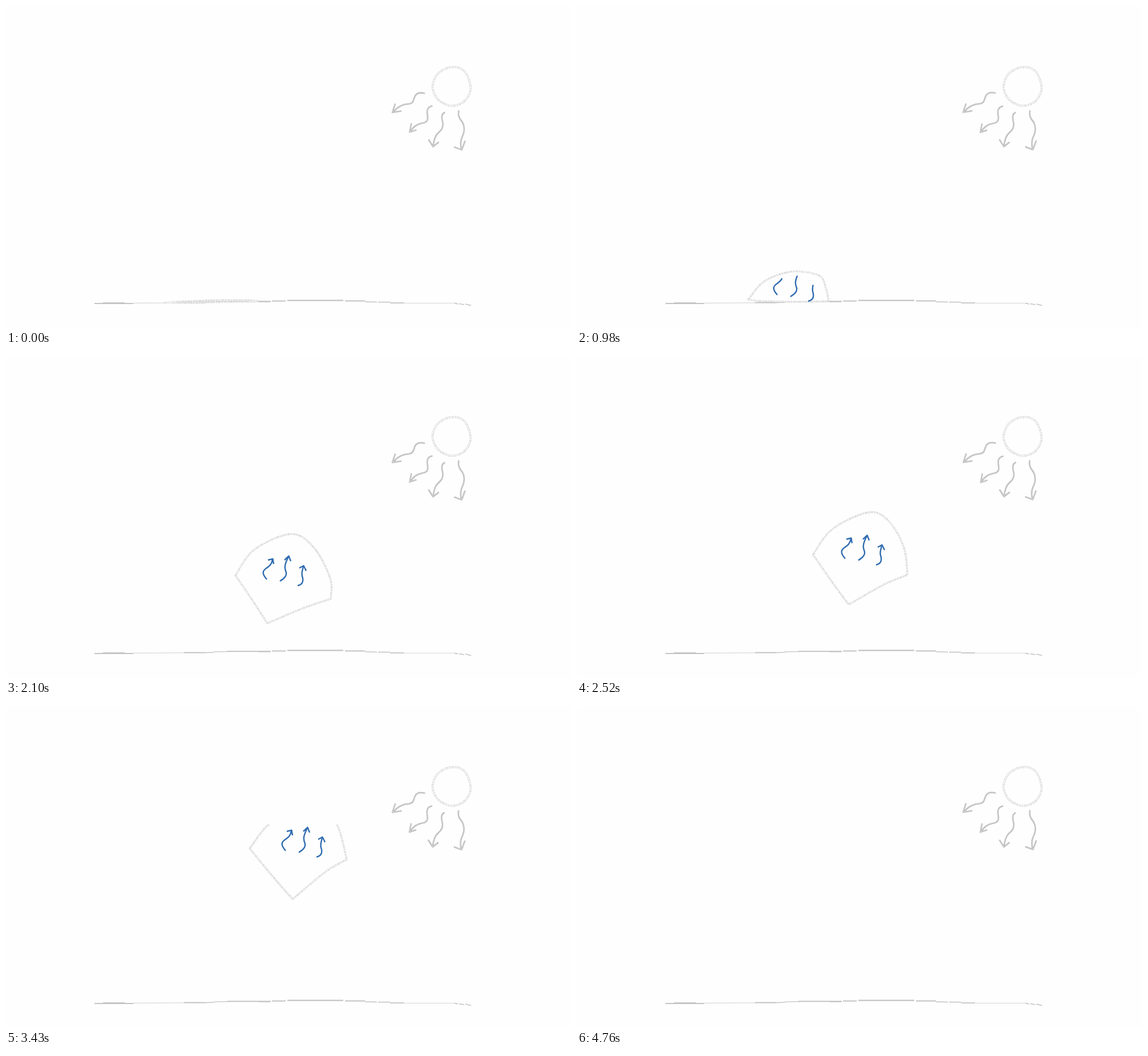
These frames come from a looping animation (990x565 px, 4830 ms). An HTML page:

```html
<!DOCTYPE html>
<html lang="en">
<head>
<meta charset="utf-8">
<title>Rising air</title>
<style>
html, body { margin: 0; width: 100%; height: 100%; overflow: hidden; background: #fefefe; }
svg { display: block; width: 990px; height: 565px; }
path { fill: none; stroke-linejoin: round; }
.edge { stroke: #bdbdbd; stroke-width: 3; stroke-dasharray: 5 1 3 1; }
.core { stroke: #fefefe; stroke-width: 1.5; }
.ray .edge { stroke: #b2b2b2; stroke-width: 2.5; stroke-dasharray: none; }
.ray .core { stroke: #e2e2e2; stroke-width: .8; }
.ground { stroke: #c4c4c4; }
.blue { stroke: #2f6cb0; stroke-width: 2.4; }
#blob .edge { fill: #fefefe; stroke-width: 2.6; }
#blob .core { stroke-width: 1.1; }
</style>
</head>
<body>
<svg viewBox="0 0 990 565">
  <clipPath id="sky"><rect x="0" y="208" width="990" height="314"/></clipPath>
  <g id="ground"></g>
  <g clip-path="url(#sky)"><g id="blob"></g><g id="air"></g></g>
  <g id="sun"></g>
  <g id="rays"></g>
</svg>
<script>
const LOOP = 4830, STEP = 70, PULSE = 700;
const $ = id => document.getElementById(id);

function add(parent, tag, attrs = {}) {
  const el = document.createElementNS('http://www.w3.org/2000/svg', tag);
  for (const k in attrs) el.setAttribute(k, attrs[k]);
  return parent.appendChild(el);
}

// A sketched line: grey edges around a light core.
const sketch = (parent, d = '') => ['edge', 'core'].map(c => add(parent, 'path', { class: c, d }));

// Smooth curve through points, continuing from the first one.
function curve(pts, closed) {
  const n = pts.length;
  const at = i => closed ? pts[(i + n) % n] : pts[Math.max(0, Math.min(n - 1, i))];
  let d = '';
  for (let i = 0; i < (closed ? n : n - 1); i++) {
    const [a, b, c, e] = [at(i - 1), at(i), at(i + 1), at(i + 2)];
    const xy = [0, 1].map(k => [b[k] + (c[k] - a[k]) / 6, c[k] - (e[k] - b[k]) / 6, c[k]]);
    d += 'C' + [0, 1, 2].map(j => xy[0][j].toFixed(2) + ',' + xy[1][j].toFixed(2)).join(' ');
  }
  return d;
}

// Ground pieces: path and line width.
[
  ['M155,522H223', 2.2], ['M170,520.5H208', 1], ['M223,521.3L312,520.8', .8],
  ['M312,520.5H349', 2], ['M349,520.5L364,520V519.2L390,518.6', 1.3],
  ['M388,518.2H464', 2], ['M443,519.2H463', 1], ['M466,517.6H490', 2],
  ['M493,516.6H591', 2.4], ['M594,517.6H629', 2], ['M629,519L650,519.5', 1.6],
  ['M652,519.6H673', 1.6], ['M673,521H697', 1.8], ['M697,521.4H790', .7],
  ['M786,521.5L792,523M794,522.5L803,524M805,523L815,525.5', 1.5]
].forEach(([d, w]) => add($('ground'), 'path', { class: 'ground', d, 'stroke-width': w }));

const disc = [[790,107.5],[806,118],[814,145],[803,167],[780,175],[757,164],[747.5,143],[754,122],[770,110]];
sketch($('sun'), 'M' + disc[0] + curve(disc, true) + 'Z');

const rays = [
  'M734,153C726,151 720,152 717,157C713,165 715,170 706,171.5C696,172 688,175 678,186M682,171L677,186.5L693,184',
  'M747,175.5C738,177 737,183 738,190C740,200 738,205 728,206C718,208 712,214 708,221M710,206L707,221.5L719,217.5',
  'M769,187C762,189 763,198 765,205C766,214 763,218 757,223C751,228 749,236 748,247M740,234.5L748,247L758,239',
  'M793.5,183C791,193 796,199 800,204C804,212 803,222 799,230C796,236 796,243 798,252M785,247L798.5,252L804.5,236'
].map(d => {
  const g = add($('rays'), 'g', { class: 'ray' });
  sketch(g, d);
  return g;
});

const arrows = [
  ['M457,392C452,386 448,380 453,375C458,370 465,369 467,357', 'M459,358L467.5,356L469,365'],
  ['M480,395C486,391 492,387 491,380C488,372 487,368 495,352', 'M488,358L495.5,351L499,360'],
  ['M511,403C518,401 521,398 520,390C517,382 519,378 521,369', 'M514,372L521.5,368L526,377']
].map(([shaft, head]) => ({
  shaft: add($('air'), 'path', { class: 'blue', d: shaft, pathLength: 100 }),
  head: add($('air'), 'path', { class: 'blue', d: head })
}));

// Outline poses, clockwise from the left corner.
const poses = [
  [[278,521],[310,518.5],[370,516.5],[420,516.5],[435,517],[442,518],[405,519],[362,519.5],[320,520.5]],
  [[300,515],[330,482],[378,466],[424,473],[436,495],[441,518],[405,519],[362,519],[325,518]],
  [[341,444],[387,401],[418,391.5],[460,403],[477,440],[475,484],[430,496],[391,508],[370,468]],
  [[402,385],[436,339],[500,312.5],[540,337],[568,390],[569,426],[522,442],[458,469],[430,426]],
  [[427,306],[462,262],[523,230],[552,233],[577,270],[591,335],[553,355],[497,398],[461,354]],
  [[427,194],[466,148],[533,114],[562,117],[587,155],[603,204],[568,226],[507,280],[467,236]]
];
poses.push(poses[5].map(([x, y]) => [x + 12, y - 128]));

const times = [0, 980, 1540, 2100, 3010, 3850, 4760];
const drift = [[-128,180],[-106,115],[-54,57],[0,0],[28,-79],[38,-197],[50,-325]];
const mix = (a, b, u) => a.map((v, i) => v + (b[i] - v) * u);
const blob = sketch($('blob'));

function drawArrows(phase) {
  const start = phase >= 560 ? 60 : 0;
  const end = phase < 70 ? 0 : phase < 140 ? 86 : 100;
  arrows.forEach(({ shaft, head }, i) => {
    const stop = phase < 70 && i === 1 ? 5 : end;
    shaft.setAttribute('stroke-dasharray', `0 ${start} ${stop - start} 200`);
    shaft.style.display = phase < 630 && stop > 0 ? '' : 'none';
    head.style.display = phase >= 140 && phase < 630 ? '' : 'none';
  });
}

function render(ms) {
  const step = Math.floor((ms % LOOP) / STEP), t = step * STEP;
  let k = 0;
  while (k < times.length - 2 && t >= times[k + 1]) k++;
  const u = (t - times[k]) / (times[k + 1] - times[k]);

  const p = poses[k].map((a, i) => mix(a, poses[k + 1][i], u));
  const d = 'M' + p[0] + curve(p.slice(0, 6)) + curve(p.slice(5, 8)) + curve([p[7], p[8], p[0]]) + 'Z';
  blob.forEach(el => el.setAttribute('d', d));

  $('air').setAttribute('transform', `translate(${mix(drift[k], drift[k + 1], u)})`);
  drawArrows((t - 210 + PULSE) % PULSE);

  rays.forEach((g, i) => {
    const x = .35 * Math.sin(step * 2.1 + i), y = .35 * Math.cos(step * 1.7 + i * 2);
    g.setAttribute('transform', `translate(${x.toFixed(2)},${y.toFixed(2)})`);
  });
}

const begin = performance.now();
function tick() {
  render(performance.now() - begin);
  requestAnimationFrame(tick);
}
tick();
</script>
</body>
</html>
```
